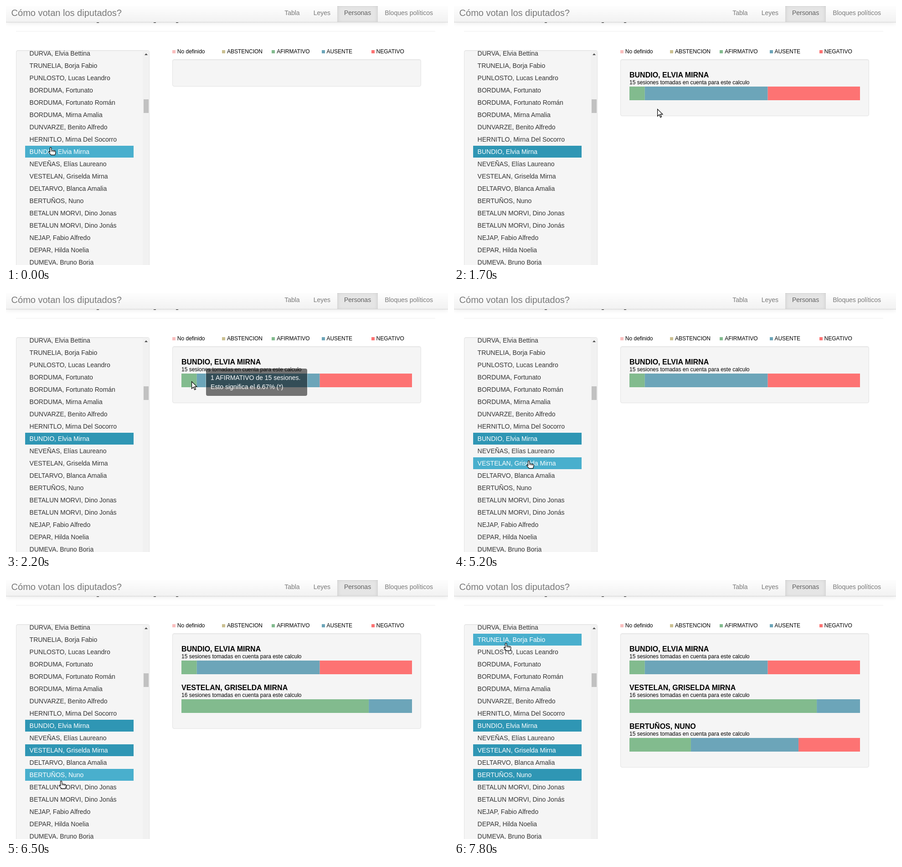
Write an HTML page that moves like this. It is 970 px wide and 569 px high and loops after 8 s.

```html
<!DOCTYPE html>
<html lang="es">
<head>
<meta charset="utf-8">
<title>Cómo votan los diputados?</title>
<style>
html, body { margin: 0; width: 100%; height: 100%; overflow: hidden; background: #fff; }
body { position: relative; font: 14px/20px "Liberation Sans", Arial, sans-serif; color: #333; white-space: nowrap; }
div, svg { position: absolute; box-sizing: border-box; }
#nav { left: 0; top: -5px; width: 970px; height: 41px; color: #777; text-shadow: 0 1px 0 #fff;
  background: linear-gradient(#fff, #f2f2f2); border-bottom: 1px solid #d4d4d4; box-shadow: 0 1px 10px rgba(0,0,0,.1); }
#brand { left: 11.6px; top: 10px; font-size: 20px; }
#links { right: 18px; top: 0; display: flex; }
#links div { position: static; height: 40px; padding: 10px 15px; }
#links .on { color: #555; background: #e5e5e5; box-shadow: inset 0 3px 8px rgba(0,0,0,.125); }
.stem { top: 30px; width: 5px; height: 7px; background: #222; }
#rule { left: 22px; top: 55px; width: 920px; height: 1px; background: #eee; }
.well { background: #f5f5f5; border: 1px solid #e3e3e3; border-radius: 4px; box-shadow: inset 0 1px 1px rgba(0,0,0,.05); }
#list { left: 22px; top: 97px; width: 293px; height: 500px; overflow: hidden; }
.row { left: 19px; width: 238px; height: 26px; padding: 3px 9.6px; }
.hover { background: #49afcd; color: #fff; }
.active { background: #2f96b4; color: #fff; }
#track { left: 277px; top: 0; width: 15px; height: 500px; background: #f1f1f1; }
#thumb { left: 2px; top: 107px; width: 11px; height: 30px; background: #c1c1c1; }
#up { left: 4px; top: 6px; width: 7px; height: 4px; background: #505050; clip-path: polygon(50% 0, 100% 100%, 0 100%); }
.key { top: 93px; font-size: 12px; line-height: 14px; color: #000; padding-left: 10.8px; }
.key div { left: 0; top: 4px; width: 7px; height: 7px; }
#panel { left: 365px; top: 117px; width: 546px; }
.chart { left: 385px; color: #000; }
.chart b { position: absolute; top: 2px; font-size: 16px; line-height: 17px; }
.chart span { position: absolute; top: 20px; font-size: 12px; line-height: 14px; }
.chart svg { left: 0; top: 36px; }
#tip { width: 222px; height: 60px; padding: 10px; color: #fff; background: rgba(0,0,0,.53);
  border-radius: 4px; box-shadow: 0 0 0 1px rgba(255,255,255,.4); }
.cursor { overflow: visible; width: 20px; height: 22px; fill: #fff; stroke: #000; stroke-width: 1.2; }
</style>
</head>
<body>
<div class="stem" style="left:199px"></div>
<div class="stem" style="left:324px"></div>
<div class="stem" style="left:373px"></div>
<div id="nav">
  <div id="brand">Cómo votan los diputados?</div>
  <div id="links"><div>Tabla</div><div>Leyes</div><div class="on">Personas</div><div>Bloques políticos</div></div>
</div>
<div id="rule"></div>
<div id="list" class="well"><div id="track"><div id="up"></div><div id="thumb"></div></div></div>
<div id="panel" class="well"></div>
<div id="tip">1 AFIRMATIVO de 15 sesiones.<br>Esto significa el 6.67% (*)</div>
<svg id="hand" class="cursor"><path d="M3.5 2.2a1.6 1.6 0 0 1 3.2 0V6.8l7.3 1.4q1.8.5 1.8 2.3v2.5l-1.4 4.4H6L1 11.8q-.8-2 1-2.2l1.5 1.4z"/><path d="M7 10v-2M9.8 10.5v-2M12.6 11v-2" fill="none"/></svg>
<svg id="arrow" class="cursor"><path d="M.6.6v15.6l3.8-3.6 2.6 6 2.5-1.1-2.6-5.7h5z"/></svg>
<script>
const LOOP = 8000, BAR = 506;
const GREEN = [130, 187, 142], BLUE = [108, 165, 185], RED = [253, 115, 115];
const names = ["DURVA, Elvia Bettina", "TRUNELIA, Borja Fabio", "PUNLOSTO, Lucas Leandro", "BORDUMA, Fortunato",
  "BORDUMA, Fortunato Román", "BORDUMA, Mirna Amalia", "DUNVARZE, Benito Alfredo", "HERNITLO, Mirna Del Socorro",
  "BUNDIO, Elvia Mirna", "NEVEÑAS, Elías Laureano", "VESTELAN, Griselda Mirna", "DELTARVO, Blanca Amalia",
  "BERTUÑOS, Nuno", "BETALUN MORVI, Dino Jonas", "BETALUN MORVI, Dino Jonás", "NEJAP, Fabio Alfredo",
  "DEPAR, Hilda Noelia", "DUMEVA, Bruno Borja"];

// grow: [time, share of full width and brightness]
const charts = [
  { row: 8, total: 15, votes: [[1, GREEN], [8, BLUE], [6, RED]], grow: [[500, .2], [600, .6], [700, 1]] },
  { row: 10, total: 16, votes: [[13, GREEN], [3, BLUE]], grow: [[5400, .3], [5800, 1]] },
  { row: 12, total: 15, votes: [[4, GREEN], [7, BLUE], [4, RED]], grow: [[7100, .41], [7800, 1]] }
];
const hovers = [[0, 8], [1500, -1], [5200, 10], [6200, 12], [7100, 10], [7800, 1]];
const moves = [[0, "hand", 93, 310], [1300, "hand", 120, 313], [1400, "hand", 195, 312], [1500, "arrow", 310, 290],
  [1600, "arrow", 405, 250], [1700, "arrow", 446, 226], [1800, "arrow", 440, 222], [1900, "arrow", 425, 213],
  [2000, "arrow", 411, 204], [2100, "arrow", 407, 194], [5200, "hand", 159, 368], [5800, "hand", 150, 382],
  [6200, "hand", 120, 429], [6500, "hand", 116, 441], [7100, "hand", 133, 380], [7800, "hand", 109, 138]];
const tips = [[0], [2100, 443, 176], [2200, 439, 166], [5200]];

const $ = id => document.getElementById(id);
const at = (steps, t) => steps.filter(s => s[0] <= t).pop();
const show = (el, on) => el.style.display = on ? "" : "none";
const place = (el, x, y) => { el.style.left = x + "px"; el.style.top = y + "px"; };
const rgb = (c, k = 1) => `rgb(${c.map(v => Math.round(v * k))})`;

function add(parent, cls, x, y, html) {
  const el = document.createElement("div");
  el.className = cls;
  el.innerHTML = html;
  place(el, x, y);
  return parent.appendChild(el);
}

const rows = names.map((name, i) => add($("list"), "row", 19, 27 * i - 7, name));
$("list").append($("track"));

[["No definido", [249, 190, 190]], ["ABSTENCION", [202, 192, 145]], ["AFIRMATIVO", GREEN], ["AUSENTE", BLUE], ["NEGATIVO", RED]]
  .forEach(([label, c], i) => add(document.body, "key", 365 + 546 / 5 * i, 93, `<div style="background:${rgb(c)}"></div>${label}`));

charts.forEach((c, i) => {
  c.el = add(document.body, "chart", 385, 141 + 85 * i,
    `<b>${names[c.row].toUpperCase()}</b><span>${c.total} sesiones tomadas en cuenta para este calculo</span>` +
    `<svg width="${BAR}" height="30">${c.votes.map(() => '<rect height="30"/>').join("")}</svg>`);
  c.rects = c.el.querySelectorAll("rect");
});
document.body.append($("tip"), $("hand"), $("arrow"));

function drawChart(c, t) {
  const step = at(c.grow, t);
  show(c.el, step);
  if (!step) return;
  let x = 0;
  c.votes.forEach(([n, color], i) => {
    const w = n / c.total * BAR * step[1], r = c.rects[i];
    r.setAttribute("x", x);
    r.setAttribute("width", w);
    r.setAttribute("fill", rgb(color, step[1]));
    x += w;
  });
}

function draw(t) {
  const open = charts.filter(c => c.grow[0][0] <= t);
  const hover = at(hovers, t)[1];
  rows.forEach((el, i) => {
    el.className = "row " + (open.some(c => c.row === i) ? "active" : i === hover ? "hover" : "");
  });
  $("panel").style.height = (open.length ? 40 + 85 * open.length : 60) + "px";
  charts.forEach(c => drawChart(c, t));

  const [, kind, x, y] = at(moves, t);
  for (const id of ["hand", "arrow"]) show($(id), id === kind);
  place($(kind), x, y);

  const [, tx, ty] = at(tips, t);
  show($("tip"), tx);
  if (tx) place($("tip"), tx, ty);
}

const start = performance.now();
function tick() {
  draw((performance.now() - start) % LOOP);
  requestAnimationFrame(tick);
}
tick();
</script>
</body>
</html>
```
